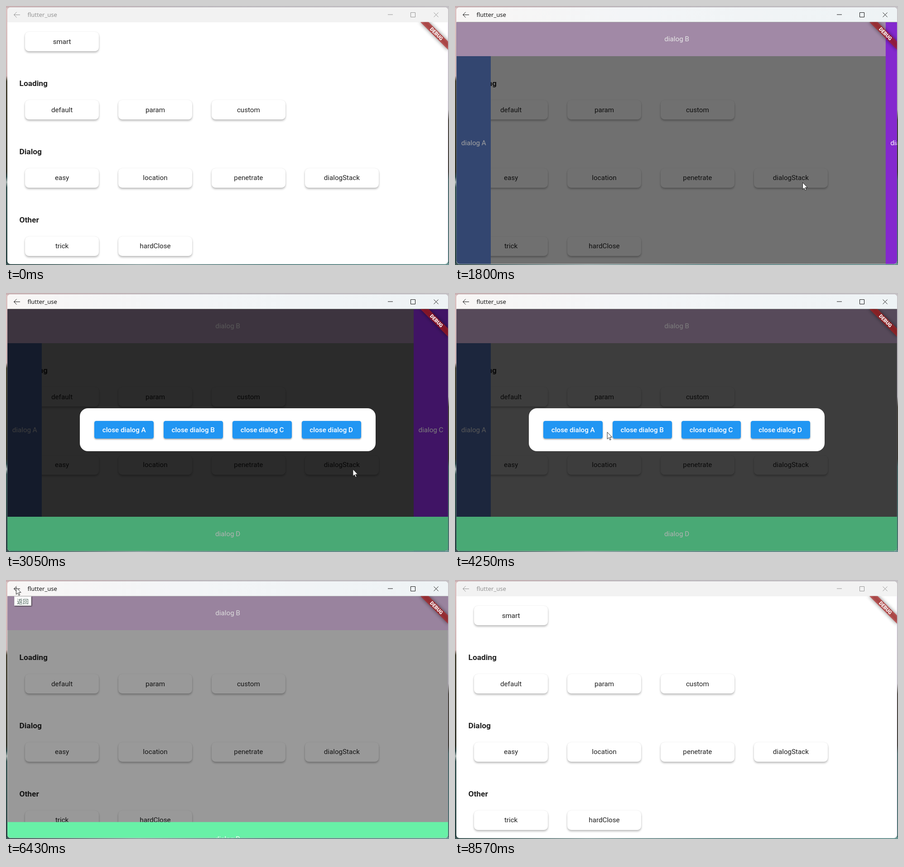
Write an HTML page that moves like this. It is 978x573 px and loops after 8600 ms.

```html
<!DOCTYPE html>
<html>
<head>
<meta charset="utf-8">
<style>
html, body { margin: 0; width: 100%; height: 100%; overflow: hidden; }
body {
  position: relative;
  font: 15.18px Roboto, sans-serif;
  color: #212121;
  background:
    linear-gradient(90deg, #3e5655, #8fa3a3 30%, #5f8585 60%, #6b9492) 0 100% / 100% 4px no-repeat,
    linear-gradient(90deg, #c9b1b3, #bdb9be 40%, #c3c0c4) 0 0 / 100% 4px no-repeat,
    linear-gradient(#c9c6c9, #b9b8ba 40%, #45443a 44%, #38382f 64%, #41625f 67%, #4d7371) 100% 0 / 50% 100% no-repeat,
    linear-gradient(#dcc3c3, #cfb5b5 27%, #4a4636 29%, #33342a 64%, #2d4a4a 66%, #a9b5b2 68%, #3a5654 70%, #2e4746);
}
div, svg { position: absolute; box-sizing: border-box; }
.center { display: flex; align-items: center; justify-content: center; white-space: nowrap; }
#window { left: 3.3px; top: 3px; width: 972.6px; height: 567.6px; border-radius: 7px; overflow: hidden; background: #fff; }
#bar, #activeBar { left: 0; top: 0; width: 100%; height: 32.5px; background: #f2f2f2; }
#activeBar { background: linear-gradient(90deg, #f8f6f5, #f3f5f7 40%, #eef3f5); }
#title { left: 47.5px; top: 10px; font: 13px/18px "Noto Sans", sans-serif; }
#client { inset: 0; clip-path: inset(35.5px 2.1px 2.4px 3.3px round 0 0 7px 7px); }
.heading { left: 29.5px; height: 24px; font-size: 17.34px; font-weight: 700; }
.card { width: 162.6px; height: 43.4px; border-radius: 8.7px; background: #fff;
  box-shadow: 0 3px 4px rgba(0,0,0,.26), 0 0 2px rgba(0,0,0,.1); }
.mask { inset: 0; background: rgba(0,0,0,.3); }
.panel { color: #fff; }
#E { border-radius: 18px; background: #fff; }
.button { top: 28.4px; width: 131px; height: 39px; border-radius: 4.3px; background: #2196f3;
  color: #fff; font-weight: 500; box-shadow: 0 2px 3px rgba(0,0,0,.28), 0 1px 4px rgba(0,0,0,.12); }
#ribbon { left: 975.9px; top: 35.5px; width: 0; height: 0; transform: rotate(45deg); }
#ribbon div { left: -43.4px; top: 30.4px; width: 86.8px; height: 13px; }
#ribbonShade { background: rgba(0,0,0,.5); filter: blur(4px); }
#ribbonBand { background: rgba(183,28,28,.627); color: #fff; font-size: 11px; font-weight: 900; }
#tooltip { left: 18px; top: 36px; width: 38px; height: 21px; background: #fff; color: #4a6259;
  border: 1px solid #d8d8d8; box-shadow: 1px 1px 2px rgba(0,0,0,.7); font: 13px "Noto Sans CJK SC", sans-serif; }
#icons { left: 0; top: 0; fill: none; }
#cursor { left: 0; top: 0; overflow: visible; }
</style>
</head>
<body>
<div id="window"><div id="bar"></div><div id="activeBar"></div></div>
<div id="title">flutter_use</div>
<svg id="icons" width="978" height="36">
  <path d="M31 19.5H17.5M23.5 13.5L17.5 19.5L23.5 25.5M843 19H854M893.5 14.5H903.5V24.5H893.5ZM944.5 14.5L954.5 24.5M954.5 14.5L944.5 24.5"/>
</svg>
<div id="client"></div>
<div id="tooltip" class="center">返回</div>
<svg id="cursor" width="14" height="20">
  <path d="M.5 .5V15.8L3.9 12.6L6.3 18L8.6 17L6.2 11.7H11.1Z" fill="#fff" stroke="#111" stroke-width=".9"/>
</svg>
<script>
const LOOP = 8600, DURATION = 260;
const byId = id => document.getElementById(id);
const client = byId('client');

function add(parent, className, text = '', box = {}) {
  const el = document.createElement('div');
  el.className = className;
  el.textContent = text;
  for (const key in box) el.style[key] = box[key] + 'px';
  parent.append(el);
  return el;
}

// Page: rows of cards under headings
const rows = [
  ['', 'smart'],
  ['Loading', 'default', 'param', 'custom'],
  ['Dialog', 'easy', 'location', 'penetrate', 'dialogStack'],
  ['Other', 'trick', 'hardClose'],
];
rows.forEach(([heading, ...cards], row) => {
  const top = 57 + row * 150.9;
  add(client, 'heading center', heading, { top: top - 48.5 });
  cards.forEach((name, i) => add(client, 'card center', name, { left: 42.3 + i * 205.9, top }));
});

// Dialogs in stacking order; dx, dy give the edge each one slides from
const dialogs = [
  { id: 'A', open: 740, close: 4620, dx: -1, color: '#526fb2', box: [3.3, 35.5, 75.9, 535.1] },
  { id: 'B', open: 1240, close: 7480, dy: -1, color: '#b298b8', box: [3.3, 35.5, 972.6, 75.9] },
  { id: 'C', open: 1740, close: 3640, dx: 1, color: '#8428ce', box: [900, 35.5, 75.9, 535.1] },
  { id: 'D', open: 2240, close: 6260, dy: 1, color: '#68f1a7', box: [3.3, 494.7, 972.6, 75.9] },
  { id: 'E', open: 2740, close: 5760, box: [162.8, 255.3, 653.4, 95.2] },
];
for (const d of dialogs) {
  const [left, top, width, height] = d.box;
  d.mask = add(client, 'mask');
  d.panel = add(client, 'panel center', d.color ? 'dialog ' + d.id : '', { left, top, width, height });
  d.panel.id = d.id;
  if (d.color) d.panel.style.background = d.color;
}
[...'ABCD'].forEach((name, i) =>
  add(byId('E'), 'button center', 'close dialog ' + name, { left: 32.2 + i * 152.5 }));

const ribbon = add(client, '');
ribbon.id = 'ribbon';
add(ribbon, '').id = 'ribbonShade';
add(ribbon, 'center', 'DEBUG').id = 'ribbonBand';

// Pointer stops: time, x, y
const stops = [
  [70, 900, 576], [640, 767, 390], [2990, 767, 390], [3050, 765.5, 389.5], [3440, 563, 305],
  [3920, 563, 305], [4400, 268, 308], [5180, 268, 308], [5385, 120, 208], [5420, 42.5, 109],
  [5560, 22, 16], [6720, 22, 16], [7310, 268.5, 90], [7450, 320, 165], [7620, 320, 165], [8020, 900, 576],
];
const clamp = v => Math.min(1, Math.max(0, v));
const slope = (i, axis) => stops[i + 1]
  ? (stops[i + 1][axis] - stops[i][axis]) / (stops[i + 1][0] - stops[i][0]) : 0;

function tangent(i, axis) {
  const a = i ? slope(i - 1, axis) : 0, b = slope(i, axis);
  return a * b > 0 ? 2 * a * b / (a + b) : 0;
}

// Monotone cubic through the stops
function pointer(t, axis) {
  const last = stops.length - 1;
  if (t <= stops[0][0]) return stops[0][axis];
  if (t >= stops[last][0]) return stops[last][axis];
  const i = stops.findIndex(s => s[0] > t) - 1;
  const [p, q] = [stops[i], stops[i + 1]];
  const span = q[0] - p[0], u = (t - p[0]) / span, v = 1 - u;
  return p[axis] * v * v * (1 + 2 * u) + q[axis] * u * u * (3 - 2 * u)
    + span * u * v * (v * tangent(i, axis) - u * tangent(i + 1, axis));
}

function shown(t, { open, close }) {
  const linear = t < close ? clamp((t - open) / DURATION) : 1 - clamp((t - close) / DURATION);
  return 1 - (1 - linear) ** 1.5;
}

function draw() {
  const t = performance.now() % LOOP;
  for (const d of dialogs) {
    const p = shown(t, d), away = (1 - p) * 100;
    d.mask.style.opacity = p;
    d.panel.style.transform = d.color
      ? `translate(${(d.dx || 0) * away}%, ${(d.dy || 0) * away}%)` : `scale(${p})`;
  }
  const active = clamp((t - 640) / 60) * (1 - clamp((t - 8490) / 80));
  const ink = Math.round(148 - 126 * active);
  byId('activeBar').style.opacity = active;
  byId('title').style.color = byId('icons').style.stroke = `rgb(${ink},${ink},${ink})`;
  byId('tooltip').style.visibility = t > 6100 && t < 7500 ? 'visible' : 'hidden';
  byId('cursor').style.transform = `translate(${pointer(t, 1)}px, ${pointer(t, 2)}px)`;
  requestAnimationFrame(draw);
}
draw();
</script>
</body>
</html>
```
